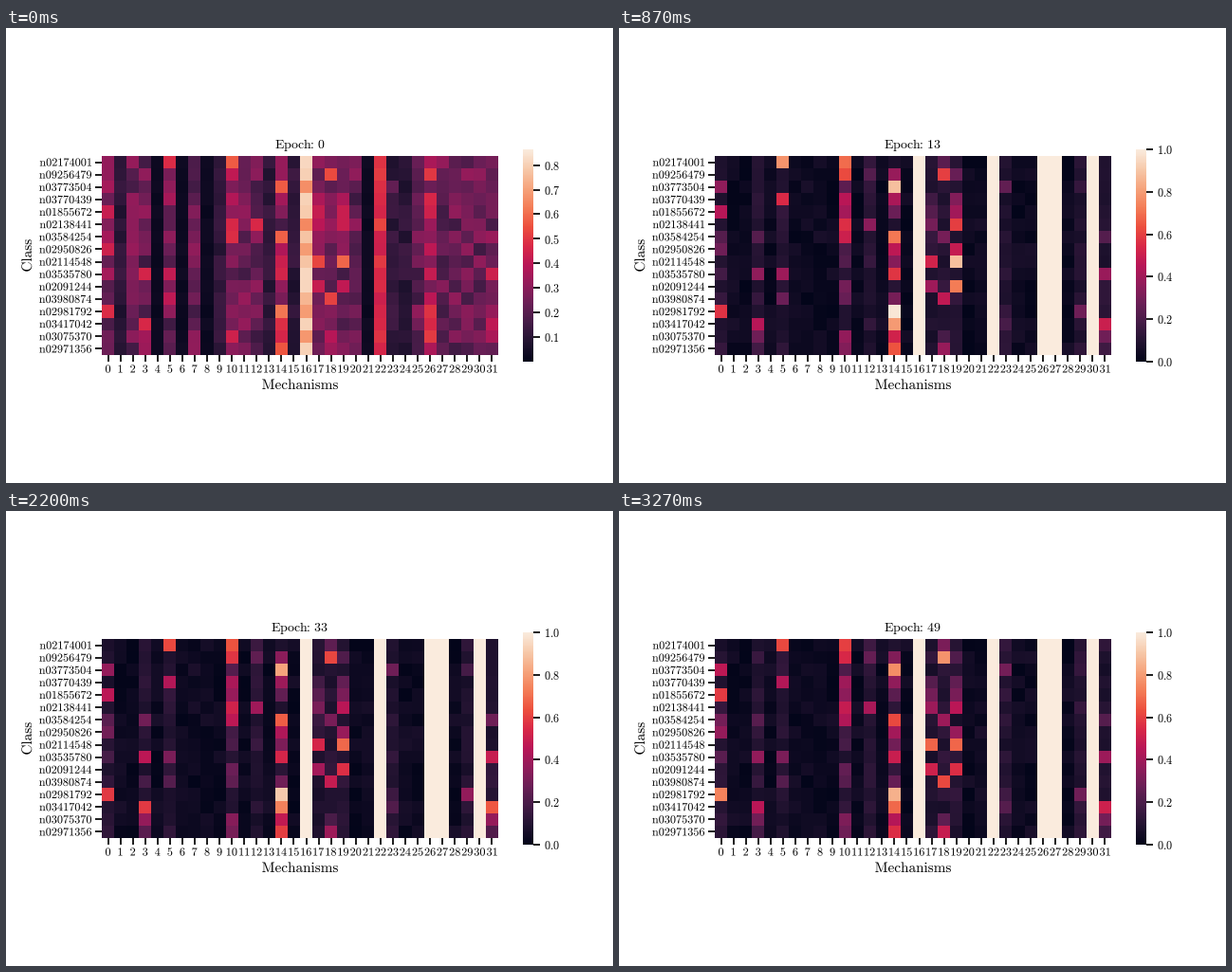
These frames come from a looping animation (640x480 px, 3.34 s). A matplotlib script:

```python
import matplotlib.pyplot as plt
import numpy as np
from matplotlib.animation import FuncAnimation
from matplotlib.colors import LinearSegmentedColormap
from matplotlib.patches import PathPatch
from matplotlib.textpath import TextPath
from matplotlib.transforms import Affine2D

W, H, DPI = 640, 480, 100
LOOP_MS, TICK_MS = 3340, 20
EPOCHS, SETTLED = 50, 9
ROWS, COLS = 16, 32
LEFT, TOP, RIGHT, BOTTOM = 101, 135, 519, 345
CLASSES = """n02174001 n09256479 n03773504 n03770439 n01855672 n02138441
n03584254 n02950826 n02114548 n03535780 n02091244 n03980874 n02981792
n03417042 n03075370 n02971356""".split()

# Mechanism -> strength, epoch at which it is strongest, classes by rank.
ACTIVE = {
    0: (.57, 49, [12, 4, 2, 7, 6, 9]),
    3: (.45, 33, [13, 9, 14, 6, 15, 11]),
    5: (.62, 9, [0, 3, 9, 11]),
    10: (.6, 21, [0, 1, 5, 6, 3, 4, 14, 15, 10, 11, 2, 8, 7]),
    12: (.35, 42, [5, 1, 0]),
    14: (.85, 21, [12, 2, 13, 6, 15, 9, 14, 7, 3, 1, 8, 11, 4]),
    17: (.52, 49, [8, 10, 5, 4, 3]),
    18: (.6, 49, [1, 11, 15, 6, 0, 14]),
    19: (.68, 13, [8, 10, 5, 7, 4, 3, 1]),
    23: (.25, 42, [2, 13, 12, 6, 7]),
    29: (.28, 33, [12, 2]),
    31: (.5, 33, [13, 9, 14, 6, 15])}
SATURATED = [16, 22, 26, 27, 30]

plt.rcParams["mathtext.fontset"] = "cm"
rng = np.random.default_rng(4)
cmap = LinearSegmentedColormap.from_list("heat", [
    "#03051a", "#221331", "#451c47", "#6a1f56", "#921c5b", "#b91657",
    "#d92847", "#ed503e", "#f47d57", "#f6a47c", "#f7c9aa", "#faebdd"])


def start_grid():
    means = np.full(COLS, .27)
    means[[4, 6, 8, 21]] = .03
    means[[1, 9, 13, 15, 23, 24]] = .12
    means[[16, 22, 26]] = .85, .55, .42
    spread = np.where(means > .5, .12, .4)
    grid = means * (1 + spread * rng.uniform(-1, 1, (ROWS, COLS)))
    for col, (strength, _, rows) in ACTIVE.items():
        grid[rows, col] += .5 * strength * rank_weights(rows)
    return grid


def rank_weights(rows):
    return .25 ** (np.arange(len(rows)) / len(rows))


def settled_grid(epoch):
    grid = quiet * (1 + .2 * np.sin(phase + .6 * epoch))
    for col, (strength, best, rows) in ACTIVE.items():
        surge = 1 + .3 * np.exp(-((epoch - best) / 10) ** 2)
        grid[rows, col] = strength * surge * rank_weights(rows)
    grid[:, SATURATED] = 1
    return grid


def grid_at(epoch):
    left = max(0, 1 - epoch / SETTLED) ** 2
    return np.clip(left * start + (1 - left) * settled_grid(epoch), 0, 1)


start = start_grid()
quiet = .03 * rng.uniform(0, 2, (ROWS, COLS))
quiet[:, list(ACTIVE)] += .07
phase = rng.uniform(0, 2 * np.pi, (ROWS, COLS))


def roman(text):
    # Cancels the relation spacing that math mode puts around a colon.
    text = text.replace(": ", r"\hspace{-0.2}:\hspace{-0.2}\ ")
    return rf"$\mathrm{{{text}}}$"


def pixel_axes(left, top, right, bottom):
    ax = fig.add_axes([left / W, 1 - bottom / H,
                       (right - left) / W, (bottom - top) / H])
    ax.spines[:].set_visible(False)
    ax.tick_params(length=4.8, width=1.25, labelsize=8.8)
    return ax


def stamp(text, x, baseline, size, anchor=.5, angle=0):
    """Draw fixed text as an outline, which is quick to repaint."""
    path = TextPath((0, 0), roman(text), size=size)
    box = path.get_extents()
    place = (Affine2D().translate(-box.x0 - anchor * box.width, 0)
             .rotate_deg(angle).translate(x, H - baseline))
    page.add_patch(PathPatch(place.transform_path(path), color="black", lw=0))


fig = plt.figure(figsize=(W / DPI, H / DPI), dpi=DPI, facecolor="white")

page = pixel_axes(0, 0, W, H)
page.set(xlim=(0, W), ylim=(0, H))
page.axis("off")
for col in range(COLS):
    stamp(str(col), LEFT + (col + .5) * (RIGHT - LEFT) / COLS, 363.5, 12.2)
for row, name in enumerate(CLASSES):
    middle = TOP + (row + .5) * (BOTTOM - TOP) / ROWS
    stamp(name, 90, middle + 4, 12.2, anchor=1)
stamp("Mechanisms", 310, 381, 15.2)
stamp("Class", 27, 240, 15.2, angle=90)
title = fig.text(310 / W, 1 - 127 / H, "", size=10, ha="center",
                 va="baseline")

ax = pixel_axes(LEFT, TOP, RIGHT, BOTTOM)
heat = ax.imshow(start, cmap=cmap, vmin=0, vmax=1, aspect="auto",
                 interpolation="nearest")
ax.set_xticks(range(COLS), [""] * COLS)
ax.set_yticks(range(ROWS), [""] * ROWS)

bar = pixel_axes(545, 128, 556, 352)
bar.imshow(np.linspace(0, 1, 256)[:, None], cmap=cmap, aspect="auto",
           origin="lower", extent=(0, 1, 0, 1))
bar.set_xticks([])
bar.yaxis.tick_right()
bar.tick_params(axis="y", pad=2.8)


def update(frame):
    epoch = int(((frame + 1) * TICK_MS - 1) * EPOCHS / LOOP_MS)
    heat.set_data(grid_at(epoch))
    title.set_text(roman(f"Epoch: {epoch}"))
    top = 1 - .136 * max(0, 1 - epoch / 4) ** 2
    step = .1 if top < .9 else .2
    ticks = np.arange(0 if epoch else step, top + 1e-9, step)
    bar.set_yticks(ticks / top, [roman(f"{tick:.1f}") for tick in ticks])
    bar.set_ylim(0, 1)
    return heat, title


anim = FuncAnimation(fig, update, frames=LOOP_MS // TICK_MS,
                     interval=TICK_MS, repeat=True, repeat_delay=0,
                     blit=False)
plt.show()
```
